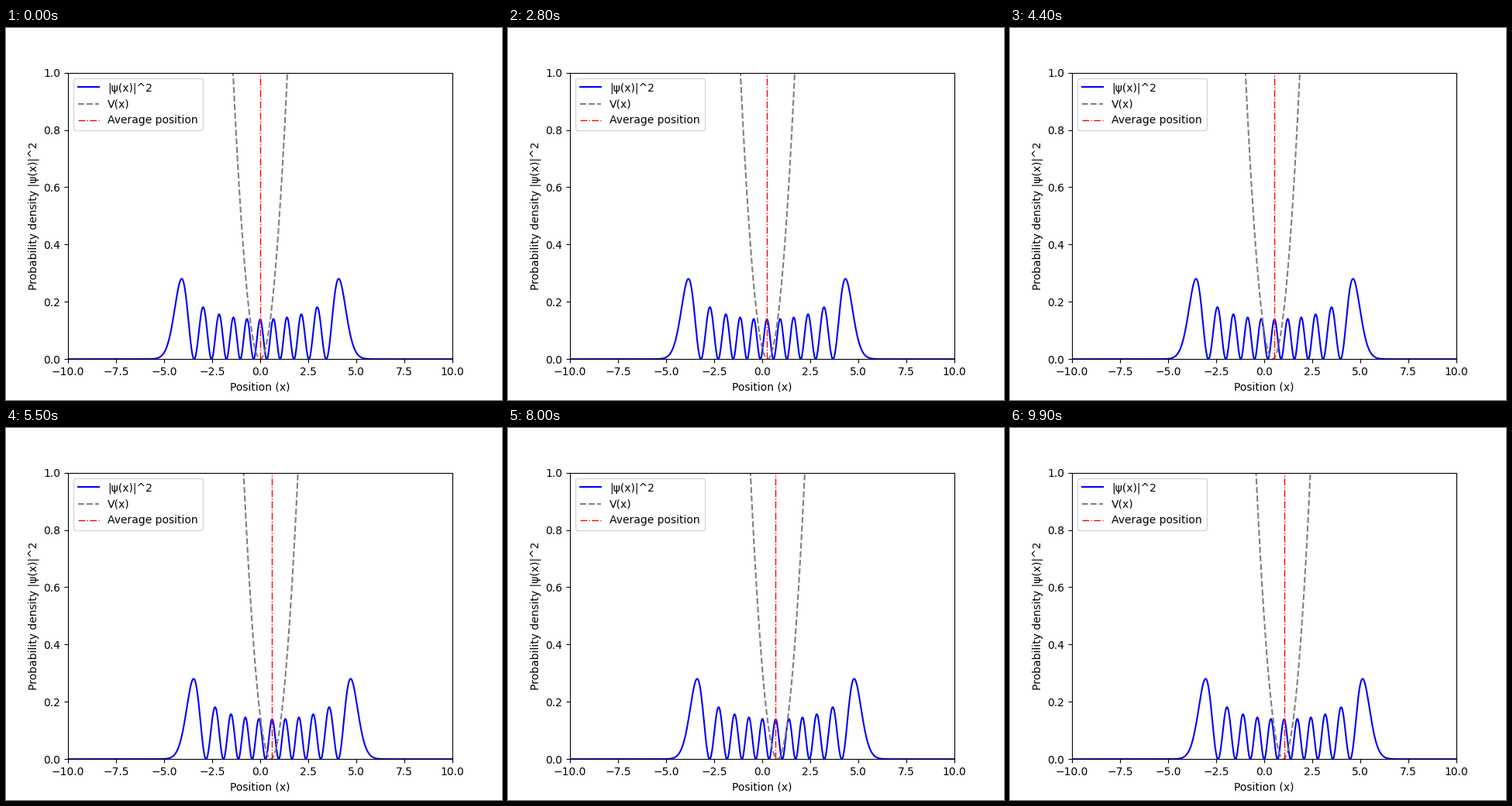
A matplotlib script that plays this animation: 640 by 480 pixels, repeating every 10 s.

```python
import math

import matplotlib.pyplot as plt
import numpy as np
from matplotlib.animation import FuncAnimation

LEVEL = 10      # oscillator eigenstate
FRAMES = 100
DT = 0.1        # simulated time per frame
SPEED = 0.1     # drift of the trap centre

x = np.linspace(-10, 10, 1000)


def density(u):
    """|psi|^2 of the harmonic oscillator eigenstate, centred on u = 0."""
    prev, psi = np.zeros_like(u), math.pi ** -0.25 * np.exp(-u**2 / 2)
    for n in range(LEVEL):
        prev, psi = psi, (math.sqrt(2 / (n + 1)) * u * psi
                          - math.sqrt(n / (n + 1)) * prev)
    return psi**2


def potential(u):
    return 0.5 * u**2


fig, ax = plt.subplots(figsize=(6.4, 4.8), dpi=100)
wave, = ax.plot(x, density(x), color="blue", label="|ψ(x)|^2")
trap, = ax.plot(x, potential(x), color="gray", ls="--", label="V(x)")
mean = ax.axvline(0, color="red", ls="-.", lw=1, label="Average position")
ax.set(xlim=(-10, 10), ylim=(0, 1), xlabel="Position (x)",
       ylabel="Probability density |ψ(x)|^2")
ax.legend(loc="upper left")


def update(i):
    # The packet starts at rest and obeys c'' = -(c - SPEED * t).
    t = i * DT
    centre = SPEED * (t - math.sin(t))
    wave.set_ydata(density(x - centre))
    trap.set_ydata(potential(x - SPEED * t))
    mean.set_xdata([centre, centre])
    return wave, trap, mean


anim = FuncAnimation(fig, update, frames=FRAMES, interval=100, repeat=True,
                     repeat_delay=0)
plt.show()
```
